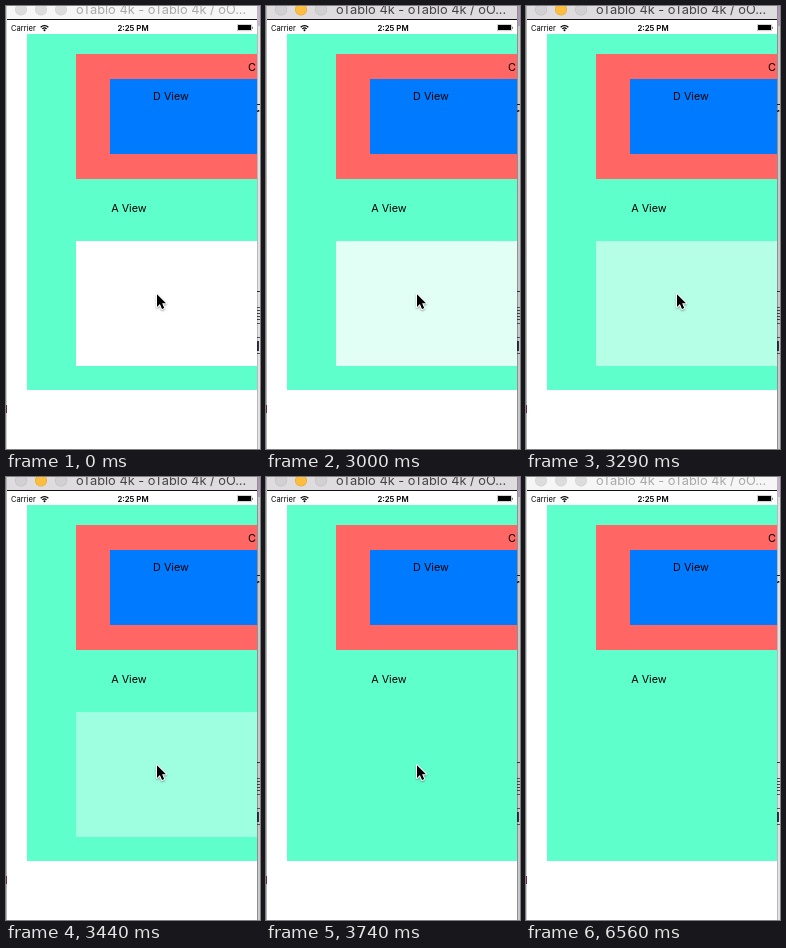
Write an HTML page with a canvas that moves like this. It is 254 px wide and 443 px high and loops after 6660 ms.

```html
<!DOCTYPE html>
<html lang="en">
<head>
<meta charset="utf-8">
<title>Fading view</title>
<style>
html, body { margin: 0; width: 100%; height: 100%; overflow: hidden; background: #fff; }
canvas { display: block; }
</style>
</head>
<body>
<canvas id="stage" width="254" height="443"></canvas>
<script>
const ctx = document.getElementById('stage').getContext('2d');
const LOOP = 6660;
const SANS = 'Inter, Roboto, "Liberation Sans", sans-serif';
const fadeTimes = [3000, 3140, 3290, 3440, 3590, 3740];

function rect(x, y, w, h, color) {
  ctx.fillStyle = color;
  ctx.fillRect(x, y, w, h);
}

function disc(x, y, r, color) {
  ctx.fillStyle = color;
  ctx.beginPath();
  ctx.arc(x, y, r, 0, Math.PI * 2);
  ctx.fill();
}

function text(label, x, y, size, color = '#000', align = 'left', weight = 400) {
  ctx.font = `${weight} ${size}px ${SANS}`;
  ctx.textAlign = align;
  ctx.fillStyle = color;
  ctx.fillText(label, x, y);
}

function drawDesktop(active) {
  rect(0, 0, 254, 443, '#fff');
  rect(251, 0, 3, 443, active ? '#c8c8ca' : '#e2e2e4');
  rect(252, 0, 2, 20, active ? '#b096b8' : '#c9b2d0');
  rect(251, 98, 3, 1, '#222');
  text('r', 248, 112, 14, '#111', 'left', 600);
  rect(251, 285, 3, 1, '#333');
  for (const y of [301, 317, 331]) rect(251, y, 3, 1, '#555');
  for (let y = 304; y < 315; y += 3) rect(251, y, 3, 1, '#444');
  rect(251, 335, 2, 10, '#333348');
  rect(251, 347, 3, 1, '#555');
  rect(251, 0, 1, 443, active ? 'rgba(0,0,0,.28)' : 'rgba(0,0,0,.18)');
  rect(0, 0, 1, 443, active ? '#b4b4b4' : '#cecece');
  rect(0, 399, 1, 8, '#6b2740');
}

function drawTitleBar(active) {
  rect(1, 0, 250, 13, active ? '#dedcde' : '#f6f6f6');
  rect(1, 13, 250, 1, '#111');
  const idle = active ? '#d2d0d2' : '#dcdcdc';
  const rim = active ? '#bdbbbd' : '#d0d0d0';
  [15, 35, 55].forEach((x, i) => {
    const lit = active && i === 1;
    disc(x, 3.5, 6, lit ? '#e0a432' : rim);
    disc(x, 3.5, 5.4, lit ? '#fdbd3e' : idle);
  });
  text('oTablo 4k - oTablo 4k / oO...', 70, 8, 12.8, active ? '#454345' : '#a9a9a9');
}

function drawStatusBar() {
  rect(1, 14, 250, 429, '#fff');
  text('Carrier', 5, 24.6, 7.6);
  text('2:25 PM', 127, 24.8, 7.8, '#000', 'center', 600);
  ctx.strokeStyle = '#000';
  ctx.lineWidth = 1.3;
  for (const r of [3, 5.4]) {
    ctx.beginPath();
    ctx.arc(38.5, 25, r, -Math.PI * .75, -Math.PI * .25);
    ctx.stroke();
  }
  disc(38.5, 24.2, 1, '#000');
  ctx.strokeStyle = '#aaa';
  ctx.lineWidth = .6;
  ctx.strokeRect(231.5, 18.8, 14, 6);
  rect(232, 19, 13, 5, '#000');
  rect(246, 20.8, 1, 2, '#777');
}

function drawViews(alpha) {
  rect(21, 28, 230, 356, '#5fffcb');
  rect(70, 48, 181, 125, '#ff6664');
  rect(104, 73, 147, 75, '#007bff');
  text('D View', 165, 94, 10.8, '#000', 'center');
  text('A View', 122.9, 206, 10.8, '#000', 'center');
  text('C View', 242, 65, 10.8);
  rect(70, 235, 181, 125, `rgba(255,255,255,${alpha})`);
}

function drawCursor(x, y) {
  const arrow = new Path2D('M0 0V12.6L2.9 9.8 5 14.7 7.2 13.8 5.1 9H9Z');
  ctx.save();
  ctx.translate(x, y);
  ctx.lineJoin = 'round';
  ctx.strokeStyle = '#fff';
  ctx.lineWidth = 2;
  ctx.shadowColor = 'rgba(0,0,0,.35)';
  ctx.shadowBlur = 2;
  ctx.shadowOffsetY = 1;
  ctx.stroke(arrow);
  ctx.shadowColor = 'transparent';
  ctx.fillStyle = '#000';
  ctx.fill(arrow);
  ctx.restore();
}

// The view loses opacity in held steps, then disappears.
function viewAlpha(t) {
  const steps = fadeTimes.filter(time => time <= t).length;
  if (steps === 0) return 1;
  return steps === fadeTimes.length ? 0 : .965 - steps * .145;
}

function draw(t) {
  const active = t >= 2550 && t < 6560;
  drawDesktop(active);
  ctx.save();
  ctx.beginPath();
  ctx.rect(1, 0, 250, 443);
  ctx.clip();
  drawTitleBar(active);
  drawStatusBar();
  drawViews(viewAlpha(t));
  ctx.restore();
  if (t < 4940) drawCursor(151, 288.3);
  else if (t < 5240) drawCursor(188, 288.3);
  else if (t < 5380) drawCursor(202, 283.3);
}

function tick() {
  draw(performance.now() % LOOP);
  requestAnimationFrame(tick);
}
tick();
</script>
</body>
</html>
```
